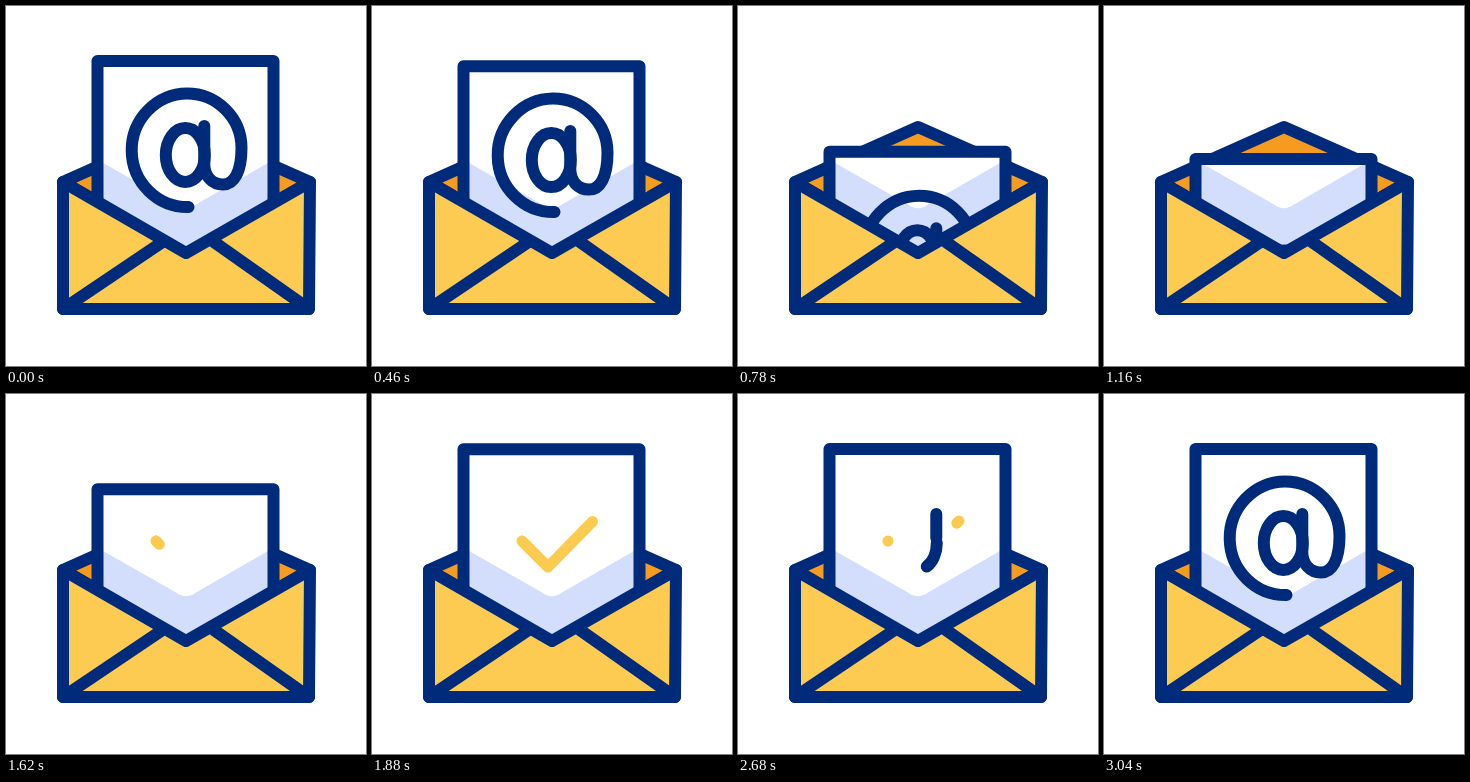
Write an HTML page that moves like this. It is 360 by 360 pixels and loops after 3600 ms.

```html
<!DOCTYPE html>
<html lang="en">
<head>
<meta charset="utf-8">
<title>Envelope</title>
<style>
  html, body { margin: 0; width: 100%; height: 100%; overflow: hidden; background: #fff; }
  svg { display: block; width: 100vw; height: 100vh; }
  .line, .tick { fill: none; stroke-linecap: round; stroke-linejoin: round; }
  .line { stroke: #002a7a; stroke-width: 12; }
  .tick { stroke: #fbca51; stroke-width: 11; }
</style>
</head>
<body>
<svg viewBox="0 0 360 360">
  <clipPath id="pocket"><path d="M91 0H268V196L180 247 91 196Z"/></clipPath>
  <path class="line" d="M57 176 180 121 304 176 180 247Z" style="fill:#f49b20"/>
  <path id="paper" fill="#fff"/>
  <path fill="#d3ddfc" d="M91 153.5 170 198.5Q180 206 190 198.500L268 153.500V200L180 247 91 200Z"/>
  <g clip-path="url(#pocket)">
    <g id="at" class="line">
      <ellipse id="bowl" cx="179.300" cy="149" rx="19.500" ry="27" pathLength="1"/>
      <path id="ring" pathLength="1" d="M198.300 120V158C198.300 170 206 178.500 217 178.500C228 178.500 235.500 166 235.500 142A54.500 54.500 0 0 0 181 87.500A56 56.700 0 0 0 182.500 201"/>
    </g>
  </g>
  <path id="tick" class="tick" pathLength="1" d="M150 147 176 173 221 127"/>
  <g id="dots" fill="#fbca51"></g>
  <path id="edge" class="line"/>
  <path fill="#fdcb52" d="M57 176 180 247 304 176 303 303H57Z"/>
  <path class="line" d="M57 303 155 237M303 303 208 236"/>
  <path class="line" d="M57 176 180 247 304 176 303 303H57Z"/>
</svg>
<script>
const LOOP = 3600;
const $ = id => document.getElementById(id);
const [paper, at, bowl, ring, tick, dots, edge] =
  ['paper', 'at', 'bowl', 'ring', 'tick', 'dots', 'edge'].map($);

const rays = [[-35, -31], [0, -50], [35, -32]].map(([x, y]) => {
  const dot = document.createElementNS('http://www.w3.org/2000/svg', 'circle');
  dots.append(dot);
  return { dot, x, y };
});

// Cubic ease in and out between two times.
function ease(t, start, end) {
  const p = Math.min(1, Math.max(0, (t - start) / (end - start)));
  return p < .5 ? 4 * p ** 3 : 1 - 4 * (1 - p) ** 3;
}

function trim(el, from, to) {
  const visible = to - from > .001;
  el.style.display = visible ? '' : 'none';
  el.style.strokeDasharray = from <= 0 && to >= 1 ? 'none' : `0 ${from} ${to - from} 2`;
}

function render(t) {
  const drop = 98 * (ease(t, 310, 950) - ease(t, 1270, 1930));
  const top = 55 + drop;
  paper.setAttribute('d', `M91.5 ${top}H267.5V196L180 247 91.5 196Z`);
  edge.setAttribute('d', `M91.5 196V${top}H267.5V196`);

  const returning = t >= 1300;
  at.setAttribute('transform', `translate(0 ${returning ? 0 : 157 * ease(t, 280, 1180)})`);
  trim(bowl, 0, returning ? ease(t, 2560, 2900) : 1);
  trim(ring, 0, returning ? ease(t, 2560, 3040) : 1);

  trim(tick, ease(t, 2440, 2740), ease(t, 1530, 1930));

  const spread = .5 + .5 * ease(t, 1940, 2280);
  const size = 5.8 * (ease(t, 1940, 2120) - ease(t, 2340, 2560));
  for (const { dot, x, y } of rays) {
    dot.setAttribute('cx', 179 + x * spread);
    dot.setAttribute('cy', 130 + y * spread);
    dot.setAttribute('r', Math.max(0, size));
  }
}

const begin = performance.now();
function loop() {
  render((performance.now() - begin) % LOOP);
  requestAnimationFrame(loop);
}
render(0);
requestAnimationFrame(loop);
</script>
</body>
</html>
```
